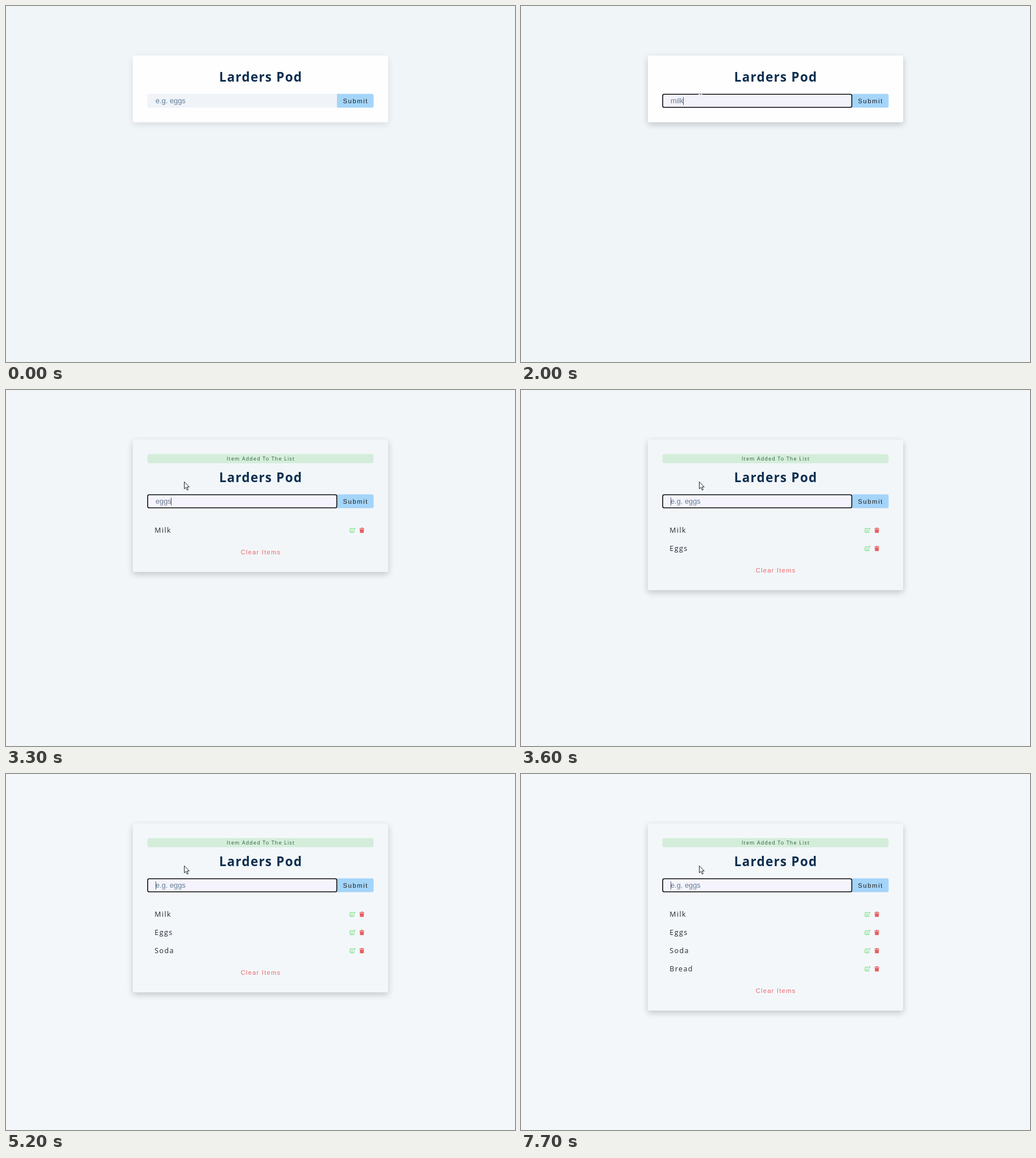
Write an HTML page with a canvas that moves like this. It is 895x626 px and loops after 8000 ms.

```html
<!DOCTYPE html>
<html lang="en">
<head>
<meta charset="utf-8">
<title>Shopping list</title>
<style>
  html, body { margin: 0; width: 100%; height: 100%; overflow: hidden; background: #f0f5f8; }
  canvas { display: block; }
</style>
</head>
<body>
<canvas id="stage" width="895" height="626"></canvas>
<script>
const ctx = document.getElementById('stage').getContext('2d');
const LOOP = 8000, FOCUS = 900;
const SANS = '"Open Sans", "Noto Sans", sans-serif';
const ARIAL = '"Liberation Sans", Arial, sans-serif';

const items = [
  { name: 'Milk', at: 2500 },
  { name: 'Eggs', at: 3600 },
  { name: 'Soda', at: 5200 },
  { name: 'Bread', at: 7700 }
];

// Field contents over time: [ms, text, caret visible]
const typing = [
  [0, '', false], [FOCUS, '', true], [1400, '', false],
  [1500, 'm', true], [1700, 'mi', true], [1800, 'mil', true], [2000, 'milk', true],
  [2500, '', true], [3000, 'eg', true], [3200, 'egg', true], [3300, 'eggs', true],
  [3600, '', true], [4100, '', false],
  [4700, 's', true], [4800, 'so', true], [4900, 'sod', true], [5000, 'soda', true],
  [5200, '', true], [5700, '', false], [6200, '', true],
  [6300, 'b', true], [6500, 'bre', true], [6700, 'brea', true], [7100, 'brea', false],
  [7400, 'bread', true], [7700, '', true]
];

const clamp = v => Math.min(1, Math.max(0, v));

function text(str, x, y, font, color, spacing = 0, align = 'left') {
  ctx.font = font;
  ctx.fillStyle = color;
  ctx.letterSpacing = spacing + 'px';
  ctx.textAlign = align;
  ctx.fillText(str, x, y);
}

function box(x, y, w, h, radius, color) {
  ctx.beginPath();
  ctx.roundRect(x, y, w, h, radius);
  ctx.fillStyle = color;
  ctx.fill();
}

function polygon(points) {
  ctx.beginPath();
  points.forEach(([x, y]) => ctx.lineTo(x, y));
  ctx.closePath();
}

function at(x, y, draw) {
  ctx.save();
  ctx.translate(x, y);
  draw();
  ctx.restore();
}

function editIcon() {
  ctx.strokeStyle = ctx.fillStyle = '#5fdc68';
  ctx.lineWidth = 1;
  ctx.beginPath();
  ctx.moveTo(5.2, 1.6);
  ctx.lineTo(1.2, 1.6);
  ctx.quadraticCurveTo(0.5, 1.6, 0.5, 2.3);
  ctx.lineTo(0.5, 7.8);
  ctx.quadraticCurveTo(0.5, 8.5, 1.2, 8.5);
  ctx.lineTo(6.9, 8.5);
  ctx.quadraticCurveTo(7.6, 8.5, 7.6, 7.8);
  ctx.lineTo(7.6, 5.8);
  ctx.stroke();
  ctx.lineWidth = 0.7;
  polygon([[3.2, 5], [7.3, 0.9], [8.9, 2.5], [4.8, 6.4], [3, 6.7]]);
  ctx.stroke();
  polygon([[7.2, 0.5], [8.2, 0], [9.8, 1.5], [9.2, 2.5]]);
  ctx.fill();
}

function trashIcon() {
  box(0, 1, 8.6, 1.3, 0.4, '#e66060');
  box(2.6, 0, 3.4, 1.4, 0.5, '#e66060');
  polygon([[0.6, 2.9], [8, 2.9], [7.5, 9.2], [1.1, 9.2]]);
  ctx.fill();
}

function arrow() {
  polygon([[0.5, 0.5], [0.5, 12.8], [3.3, 10.2], [5.5, 15.1], [7.3, 14.3], [5.3, 9.5], [9.2, 9.5]]);
  ctx.fillStyle = '#fff';
  ctx.strokeStyle = '#20242a';
  ctx.lineWidth = 1;
  ctx.fill();
  ctx.stroke();
}

function drawCursor(t, listed) {
  if (t < 100) return;
  const p = 1 - (1 - clamp((t - 100) / 700)) ** 1.7;
  const x = Math.round(51 + 262 * p), y = Math.round(161 * p);
  if (listed || y < 155) {
    at(x, y, arrow);
  } else {
    // Pale text pointer: only its tips stand out, against the focus ring
    ctx.fillStyle = '#fff';
    ctx.fillRect(x - 1, y - 6, 3, 1);
    ctx.fillRect(x + 3, y - 6, 3, 1);
  }
}

function drawCard(t, count, bg) {
  const height = count ? 201 + 32 * count : 117.5;
  ctx.save();
  ctx.shadowColor = `rgba(0,0,0,${0.1 + 0.1 * clamp((t - 500) / 300)})`;
  ctx.shadowBlur = 12;
  ctx.shadowOffsetY = 4;
  box(223, 87, 449, height, 3.2, count ? bg : '#fefefe');
  ctx.restore();
}

function drawForm(t, dy, count) {
  const focused = t >= FOCUS;
  text('Larders Pod', 448, 133 + dy, `700 22.4px ${SANS}`, '#0b2e4f', 1.28, 'center');
  box(248.7, 154.6, 0, 0, 0, 'transparent');
  box(248.7, 154.6 + dy, 333.3, 24.2, [3, 0, 0, 3], focused ? (count ? '#f5f4fc' : '#f2f2fa') : '#f0f4f8');
  box(582, 154.6 + dy, 64.4, 24.2, [0, 3, 3, 0], '#a4d5f9');
  if (focused) {
    ctx.beginPath();
    ctx.roundRect(249.2, 155.2 + dy, 332.4, 23, 2.5);
    ctx.strokeStyle = '#0d0d12';
    ctx.lineWidth = 1.6;
    ctx.stroke();
  }
  text('Submit', 592.5, 171 + dy, `11.2px ${ARIAL}`, '#1c1e22', 1.6);

  const [, value, caret] = typing.findLast(step => step[0] <= t);
  text(value || 'e.g. eggs', 263, 171 + dy, `12.8px ${ARIAL}`, value ? '#6c7a90' : '#617d98');
  if (caret) {
    const x = value ? Math.round(263 + ctx.measureText(value).width) - 1 : 263;
    ctx.fillStyle = '#4d5968';
    ctx.fillRect(x, 160 + dy, 1, 14);
  }
}

function drawList(shown) {
  box(248.7, 112.8, 397.7, 16, 3.2, '#d4edda');
  text('Item Added To The List', 448, 124.3, `8.8px ${SANS}`, '#285c38', 1.22, 'center');
  shown.forEach(({ name }, i) => {
    const y = 32 * i;
    text(name, 261.3, 251 + y, `12.5px ${SANS}`, '#222a32', 1.4);
    at(604.5, 242 + y, editIcon);
    at(621.4, 242 + y, trashIcon);
  });
  text('Clear Items', 448, 256.5 + 32 * shown.length, `11.2px ${ARIAL}`, '#ea6a6a', 1.2, 'center');
}

function draw(t) {
  const shown = items.filter(item => t >= item.at);
  const count = shown.length;
  const bg = count > 2 ? '#f3f7fa' : count ? '#f2f6f9' : '#f0f5f8';
  ctx.fillStyle = bg;
  ctx.fillRect(0, 0, 895, 626);
  drawCard(t, count, bg);
  drawForm(t, count ? 29 : 0, count);
  if (count) drawList(shown);
  drawCursor(t, count > 0);
}

const start = performance.now();
function tick() {
  const t = (performance.now() - start) % LOOP;
  draw(Math.floor(t / 100) * 100);
  requestAnimationFrame(tick);
}
tick();
</script>
</body>
</html>
```
